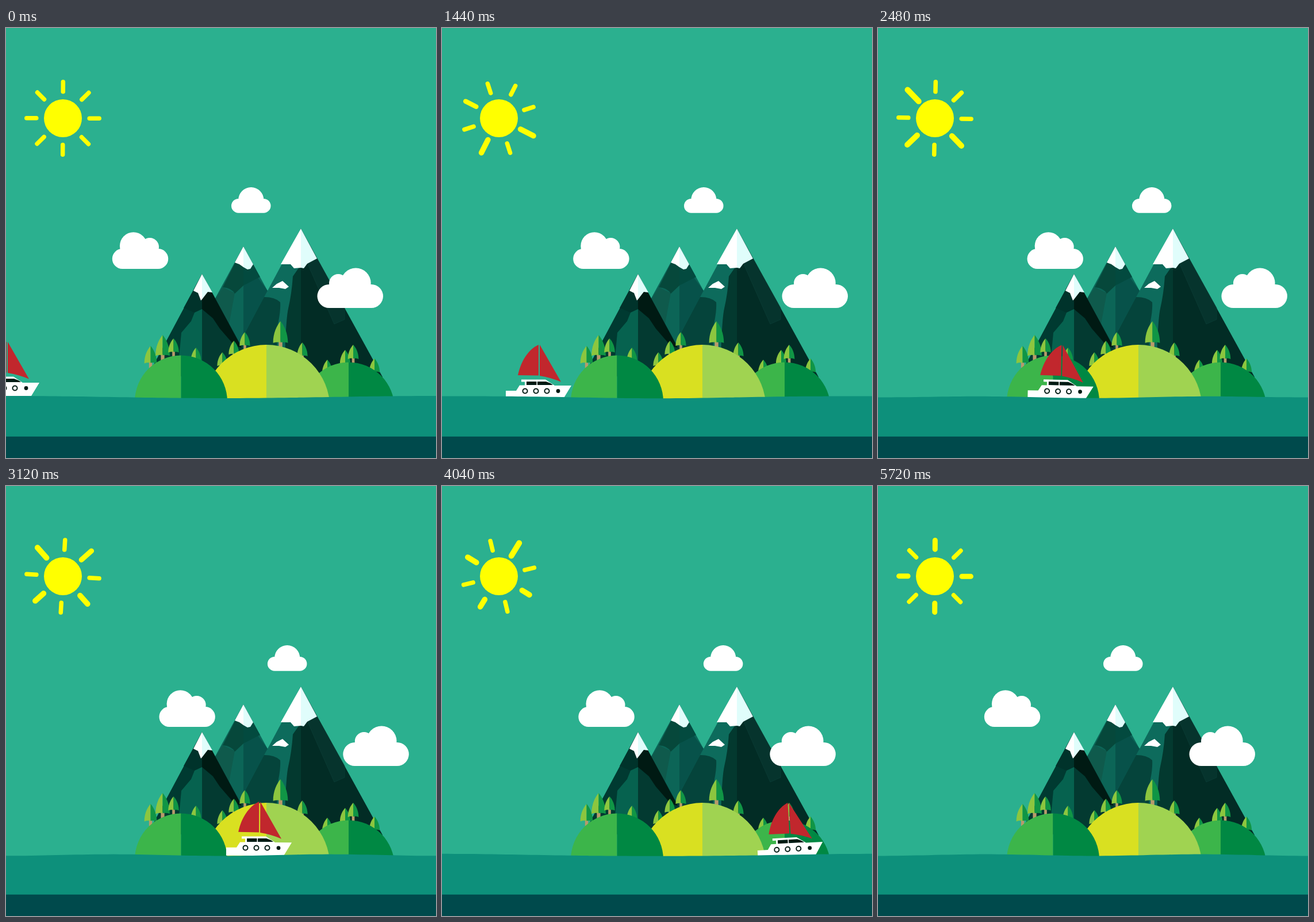
These frames come from a looping animation (748 by 748 pixels, 5760 ms). An HTML page:

```html
<!DOCTYPE html>
<html lang="en">
<head>
<meta charset="utf-8">
<title>Sailing past the mountains</title>
<style>
  html, body { margin: 0; width: 100%; height: 100%; overflow: hidden; background: #2bb08f; }
  svg { display: block; width: 100vw; height: 100vh; }
</style>
</head>
<body>
<svg viewBox="0 0 748 748">
  <rect width="748" height="748" fill="#2bb08f"/>
  <circle cx="99" cy="157" r="33" fill="#ff0"/>
  <g id="rays" stroke="#ff0" stroke-linecap="round"></g>

  <g id="middle-peak">
    <path fill="#0c6557" d="M413 380L290 606H536Z"/>
    <path fill="#0f5a4c" d="M377 451L398 461L387 520L365 560H310Z"/>
    <path fill="#06483b" d="M413 380L377 451Q392 452 398 462L413 448Z"/>
    <path fill="#07524a" d="M413 448L438 434L455 457L413 535Z"/>
    <path fill="#034a3f" d="M413 380V448L442 433Z"/>
    <path fill="#fff" d="M413 380L398 408L406 411L413 416Z"/>
    <path fill="#e0fdfb" d="M413 380V416L420 420L425 419L430 411Z"/>
  </g>

  <g id="big-peak">
    <path fill="#0d6b5c" d="M513 349L372 612H655Z"/>
    <path fill="#05443b" d="M449 468Q468 468 477 477Q478 492 473 515L469 612H372Z"/>
    <path fill="#03392f" d="M513 412L499 432Q497 462 491 488Q486 510 484 612H513Z"/>
    <path fill="#022c25" d="M513 349L655 607V630H513Z"/>
    <path fill="#06342d" stroke="#0d4038" stroke-width=".7" d="M541 401L525 411L571 515L589 507V487Z"/>
    <path fill="#fff" d="M513 349L478 411H495L501 418L513 417Z"/>
    <path fill="#e0fdfb" d="M513 349V417L518 418L524 410L541 401Z"/>
    <path fill="#fff" d="M463 452L471 445L481 440L492 450L486 454L475 452Z"/>
  </g>

  <g id="front-peak">
    <path fill="#003a31" d="M341 428L246 606H438Z"/>
    <path fill="#00332b" d="M341 428L309 487L328 495L341 489Z"/>
    <path fill="#06624f" d="M341 489L328 495L322 510L305 530L298 606H341Z"/>
    <path fill="#033a31" d="M341 489L405 548V606H341Z"/>
    <path fill="#001a13" d="M341 428L410 556L398 553L372 523L360 505L341 489Z"/>
    <path fill="#fff" d="M341 428L326 457L334 461L339 474L341 472Z"/>
    <path fill="#e0fdfb" d="M341 428V472L351 459L359 460Z"/>
  </g>

  <g id="trees"></g>
  <g id="hills"></g>

  <g id="clouds" fill="#fff">
    <g>
      <rect x="392" y="297" width="68.5" height="24.7" rx="12.3"/>
      <circle cx="426.3" cy="299" r="22"/>
    </g>
    <g>
      <rect x="184.8" y="384" width="97.4" height="35" rx="17.5"/>
      <circle cx="221.7" cy="379" r="23.8"/>
      <circle cx="250" cy="381" r="16"/>
    </g>
    <g>
      <rect x="541.5" y="446" width="114.5" height="41" rx="20.5"/>
      <circle cx="608.5" cy="443.8" r="26.2"/>
      <circle cx="578" cy="444" r="16"/>
    </g>
  </g>

  <g id="boat">
    <path fill="#c1272d" d="M168 551C150 559 137 580 132 604L168 604.5Z"/>
    <path fill="#c1272d" d="M170 551L207 615.5Q189 608 170 605Z"/>
    <path fill="#fff" d="M138 611.5H180L196 622H225L211 645H111V631H129L135 621.5H144V615.5H138Z"/>
    <path fill="#001a13" d="M147 615H164.5V621H147ZM166 615H181Q188 617 193 621H166Z"/>
    <g id="portholes" fill="#fff" stroke="#001a13" stroke-width="2"></g>
    <circle cx="202" cy="631.5" r="3.4" fill="#001a13"/>
  </g>

  <path id="sea" fill="#0d907b"/>
  <rect y="710.7" width="748" height="38" fill="#004a4c"/>
</svg>
<script>
const LOOP = 5760, STEP = 40, REST = 5720;
const $ = id => document.getElementById(id);
const clamp = v => Math.max(0, Math.min(1, v));
const triangle = (t, a, b, c) => t < b ? clamp((t - a) / (b - a)) : clamp((c - t) / (c - b));

function add(parent, tag, attrs) {
  const node = document.createElementNS('http://www.w3.org/2000/svg', tag);
  for (const name in attrs) node.setAttribute(name, attrs[name]);
  return parent.appendChild(node);
}

const green = ['#3cb54a', '#008843'], lime = ['#d9e021', '#a0d351'];

// Trees are given by their tips
const hills = [
  { x: 596, y: 661.3, r: 79.8, colors: green, tips: [[559, 577], [590, 560], [604, 551], [641, 575]] },
  { x: 453, y: 661.6, r: 110.6, colors: lime, tips: [[376.5, 564], [396.5, 544], [415.5, 529], [477.5, 510], [515.5, 547]] },
  { x: 304.5, y: 650, r: 80.5, colors: green, tips: [[251.5, 553], [272.5, 534], [291.5, 540], [330.5, 556]] }
];

function drawTree(x, top, ground) {
  const foot = Math.max(ground - 6, top + 24), h = foot - top;
  const width = 5 + .55 * h, trunk = width / 4;
  add($('trees'), 'rect', { x: x - trunk / 2, y: foot - 3, width: trunk, height: 11, fill: '#b99a6b' });
  [[-1, '#8cc63f'], [1, '#109545']].forEach(([side, fill]) => {
    const w = side * width / 2;
    const d = `M${x} ${top}c${w / 2} ${h * .2} ${w} ${h * .55} ${w} ${h}q${-w / 2} -2 ${-w} -1Z`;
    add($('trees'), 'path', { d, fill });
  });
}

hills.forEach(({ x, y, r, colors, tips }) => {
  tips.forEach(([tx, top]) => drawTree(tx, top, y - Math.sqrt(r * r - (tx - x) ** 2)));
  colors.forEach((fill, side) =>
    add($('hills'), 'path', { d: `M${x} ${y - r}A${r} ${r} 0 0 ${side} ${x} ${y + r}Z`, fill }));
});

for (let i = 0; i < 3; i++) add($('portholes'), 'circle', { cx: 144.5 + 19 * i, cy: 631.5, r: 4 });

const rays = Array.from({ length: 8 }, () => add($('rays'), 'line', { x1: 99, x2: 99 }));

// Every other ray swells, in turn
function drawSun(t) {
  const turn = .3 + 52.9 * triangle(t, 0, REST / 2, REST);
  rays.forEach((ray, k) => {
    let length = 24.5, width = 7.5;
    if (k % 2 === 0) {
      const order = (k + 6) % 8 / 2;
      const start = 300 + 325 * order * (order - 1), peak = start + 1500;
      length += 13.5 * triangle(t, start, peak, peak + 2000);
      width += 2.5 * clamp((t - start) / 1500) - clamp((t - peak) / (LOOP - peak));
    }
    const reach = (length - width) / 2;
    ray.setAttribute('y1', 102.3 - reach);
    ray.setAttribute('y2', 102.3 + reach);
    ray.setAttribute('stroke-width', width);
    ray.setAttribute('transform', `rotate(${turn + 45 * k} 99 157)`);
  });
}

// Each cloud drifts right, then back
const drifts = [{ reach: 75, turn: 3720 }, { reach: 88, turn: 2920 }, { reach: 66, turn: 1900 }];

function drawClouds(t) {
  drifts.forEach(({ reach, turn }, i) => {
    const x = reach * triangle(t, 0, turn, REST - 20);
    $('clouds').children[i].setAttribute('transform', `translate(${x} 0)`);
  });
}

// Two standing waves that trade places ever faster
function drawSea(t) {
  const phase = 2.5 * Math.PI * (t / REST) ** 2.5;
  const long = 2 * Math.cos(phase) ** 2, short = -1.4 * Math.sin(phase);
  let d = 'M0 712';
  for (let x = 0; x <= 748; x += 11) {
    const a = x / 748 * 2 * Math.PI;
    d += `L${x} ${(642 - long * Math.cos(a) - short * Math.cos(2 * a)).toFixed(2)}`;
  }
  $('sea').setAttribute('d', d + 'V712Z');
}

// Key poses: time, x, y, tilt
const voyage = [
  [0, -167, -5, 0], [1440, 0, 0, 0], [2480, 149.5, .5, 1.3],
  [3120, 272, -2, .2], [4040, 438, 0, -3.1], [4760, 642, -2, 0]
];

// Smooth curve through one column of the keys
function curve(keys, t, col) {
  const last = keys.length - 1;
  let i = 0;
  while (i < last - 1 && t >= keys[i + 1][0]) i++;
  const slope = n => {
    const a = keys[Math.max(0, n - 1)], b = keys[Math.min(last, n + 1)];
    return (b[col] - a[col]) / (b[0] - a[0]);
  };
  const p = keys[i], q = keys[i + 1];
  const span = q[0] - p[0], u = clamp((t - p[0]) / span), v = 1 - u;
  return p[col] * (1 + 2 * u) * v * v + q[col] * u * u * (3 - 2 * u) +
         span * u * v * (slope(i) * v - slope(i + 1) * u);
}

function drawBoat(t) {
  const [x, y, tilt] = [1, 2, 3].map(col => curve(voyage, t, col));
  $('boat').setAttribute('transform', `translate(${x} ${y}) rotate(${tilt} 168 635)`);
}

function render(time) {
  const t = Math.floor(time % LOOP / STEP) * STEP;
  [drawSun, drawClouds, drawSea, drawBoat].forEach(draw => draw(t));
}

const begin = performance.now();
function tick() {
  render(performance.now() - begin);
  requestAnimationFrame(tick);
}
tick();
</script>
</body>
</html>
```
